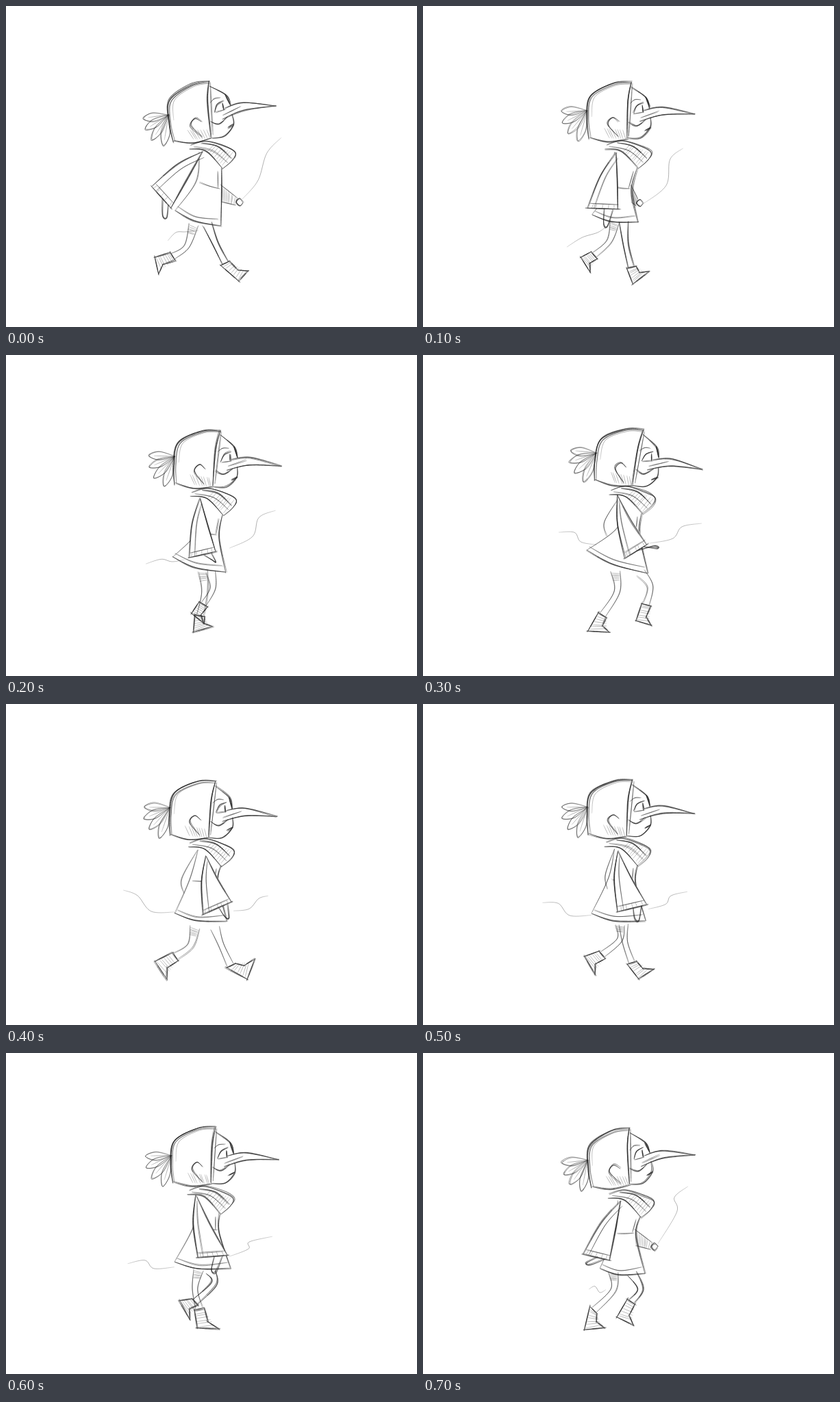
Write an HTML page with a canvas that moves like this. It is 600x469 px and loops after 0.8 s.

```html
<!DOCTYPE html>
<html lang="en">
<head>
<meta charset="utf-8">
<title>Walk cycle sketch</title>
<style>
html, body { margin: 0; width: 100%; height: 100%; overflow: hidden; background: #fff; }
canvas { display: block; width: 600px; height: 469px; }
</style>
</head>
<body>
<canvas id="stage" width="600" height="469"></canvas>
<script>
const ctx = document.getElementById('stage').getContext('2d');
const STEP = 100;

// head: shift and turn; sleeve: shoulder, cuff, cuff, hand;
// back and front: waist, hem; legs: hip, knee, ankle, heel, toe.
const reach = {
  head: [-2, 0, -6.5], collar: [2, 0],
  sleeve: [287, 213, 213, 264, 241, 295, 233, 308],
  back: [278, 256, 247, 298], front: [315, 270, 314, 321], far: [341, 287],
  nearLeg: [294, 319, 306, 348, 320, 376, 340, 402, 354, 387],
  farLeg: [274, 319, 264, 351, 243, 366, 217, 367, 223, 392],
  ahead: [345, 282, 368, 255, 381, 215, 402, 192],
  behind: [281, 328, 262, 330, 248, 331, 236, 343]
};
const plant = {
  head: [0, 0, 0], collar: [0, 0],
  sleeve: [282, 214, 240, 295, 285, 297, 268, 321],
  back: [276, 262, 247, 305], front: [305, 270, 314, 316], far: [317, 288],
  nearLeg: [293, 315, 296, 348, 304, 382, 306, 406, 330, 388],
  farLeg: [280, 315, 272, 344, 250, 364, 230, 367, 244, 389],
  ahead: [322, 289, 355, 262, 361, 224, 380, 208],
  behind: [268, 322, 255, 331, 232, 338, 210, 352]
};
const push = {
  head: [12, -4, 7], collar: [6, -5],
  sleeve: [284, 205, 295, 297, 327, 277, 341, 281],
  back: [286, 250, 239, 285], front: [316, 262, 328, 319], far: [265, 244],
  nearLeg: [281, 316, 283, 346, 262, 380, 241, 403, 272, 405],
  farLeg: [318, 318, 332, 338, 326, 365, 311, 388, 333, 395],
  ahead: [331, 275, 365, 268, 378, 251, 407, 246],
  behind: [253, 277, 230, 273, 221, 259, 198, 259]
};
const stretch = {
  head: [-1, 1, 3], collar: [0, 0],
  sleeve: [292, 222, 288, 308, 329, 290, 323, 312],
  back: [268, 256, 246, 306], front: [309, 262, 322, 318], far: [257, 255],
  nearLeg: [276, 326, 269, 353, 247, 369, 218, 376, 235, 402],
  farLeg: [305, 327, 314, 352, 328, 382, 352, 402, 363, 373],
  ahead: [332, 302, 355, 299, 369, 284, 383, 280],
  behind: [246, 304, 212, 303, 192, 280, 171, 272]
};
const pass = {
  head: [1.5, -3, 0.5], collar: [-1, -2],
  sleeve: [277, 208, 280, 299, 323, 296, 304, 319],
  back: [274, 252, 246, 305], front: [311, 262, 328, 315], far: [275, 245],
  nearLeg: [299, 320, 304, 337, 276, 364, 253, 362, 268, 389],
  farLeg: [281, 317, 276, 345, 282, 374, 279, 402, 311, 403],
  ahead: [326, 297, 354, 286, 355, 276, 389, 268],
  behind: [246, 313, 216, 315, 203, 303, 178, 308]
};
const lift = {
  head: [1, -0.5, -4.5], collar: [4, 3],
  sleeve: [289, 216, 234, 294, 272, 303, 242, 309],
  back: [280, 262, 258, 315], front: [311, 266, 324, 322], far: [338, 283],
  nearLeg: [305, 322, 317, 345, 304, 363, 283, 386, 307, 398],
  farLeg: [278, 321, 278, 347, 249, 376, 236, 404, 265, 402],
  ahead: [343, 279, 371, 232, 367, 211, 387, 195],
  behind: [267, 346, 258, 350, 251, 341, 242, 345]
};

const blend = (a, b) => Object.fromEntries(
  Object.keys(a).map(key => [key, a[key].map((v, i) => (v + b[key][i]) / 2)]));
const CYCLE = [reach, plant, blend(plant, push), push, stretch, blend(stretch, pass), pass, lift];

const pairs = v => v.flatMap((x, i) => i % 2 ? [] : [[x, v[i + 1]]]);
const mix = (a, b, t) => [a[0] + (b[0] - a[0]) * t, a[1] + (b[1] - a[1]) * t];
const add = (a, x, y) => [a[0] + x, a[1] + y];
// Point beside a, at right angles to the direction from b to c.
function side(a, b, c, d) {
  const x = c[0] - b[0], y = c[1] - b[1], r = d / Math.hypot(x, y);
  return [a[0] - y * r, a[1] + x * r];
}

let seed = 1;
function rnd(amp) {
  seed = (seed * 16807) % 2147483647;
  return (seed / 2147483647 * 2 - 1) * amp;
}

function smooth(p) {
  const out = [], n = p.length;
  for (let i = 0; i < n - 1; i++) {
    const a = p[Math.max(0, i - 1)], b = p[i], c = p[i + 1], d = p[Math.min(n - 1, i + 2)];
    for (let k = 0; k < 10; k++) {
      const t = k / 10;
      out.push([0, 1].map(j => b[j] + 0.5 * t * (c[j] - a[j] +
        t * (2 * a[j] - 5 * b[j] + 4 * c[j] - d[j] + t * (3 * (b[j] - c[j]) + d[j] - a[j])))));
    }
  }
  out.push(p[n - 1]);
  return out;
}

// One pencil pass that thins toward both ends.
function trace(points, width) {
  const p = smooth(points), n = p.length - 1;
  for (let i = 0; i < n; i++) {
    ctx.lineWidth = width * (0.5 + 0.6 * Math.sin(Math.PI * (i + 0.5) / n));
    ctx.beginPath();
    ctx.moveTo(...p[i]);
    ctx.lineTo(...p[i + 1]);
    ctx.stroke();
  }
}

// Weight 0 is a single faint line, 3 is the darkest.
function curve(points, weight = 1) {
  ctx.globalAlpha = 0.42 + weight * 0.06;
  for (let k = 0; k < Math.max(1, Math.min(3, weight + 1)); k++) {
    const amp = k ? 0.9 : 0.2, ox = rnd(amp), oy = rnd(amp);
    trace(points.map(p => add(p, ox + rnd(amp), oy + rnd(amp))), 0.75 + weight * 0.15);
  }
}
const line = (weight, ...v) => curve(pairs(v), weight);

function sides(points, weight) {
  for (let i = 1; i < points.length; i++) {
    const a = points[i - 1], b = points[i];
    curve([mix(a, b, -0.06), mix(a, b, 1.06)], weight);
  }
}

function hatch(a, b, c, d, count) {
  ctx.globalAlpha = 0.38;
  for (let i = 0; i < count; i++) {
    const t = (i + 0.5 + rnd(0.25)) / count;
    trace([mix(a, b, t), mix(c, d, t)], 0.75);
  }
}

function drawLeg([hip, knee, ankle, heel, toe], weight, striped) {
  const hl = side(hip, hip, knee, 7), hr = side(hip, hip, knee, -7);
  const kl = side(knee, hip, ankle, 4), kr = side(knee, hip, ankle, -4);
  const al = side(ankle, knee, ankle, 7), ar = side(ankle, knee, ankle, -7);
  curve([hl, kl, mix(ankle, al, 0.7)], weight);
  curve([hr, kr, mix(ankle, ar, 0.7)], weight);
  if (striped) hatch(mix(hl, kl, 0.05), mix(hl, kl, 0.5), mix(hr, kr, 0.1), mix(hr, kr, 0.45), 6);
  const instep = mix(mix(ankle, toe, 0.55), heel, 0.2);
  sides([al, ar, instep, toe, heel, al], 2);
  hatch(al, heel, ar, mix(instep, toe, 0.6), 7);
}

function drawFarArm(far, waist, nape) {
  if (far[0] > 300) {
    const a = add(waist, -2, -9), b = add(waist, -1, 16);
    const c = add(far, -3, -6), d = add(far, -6, 4);
    curve([a, c]);
    curve([b, d]);
    hatch(a, c, b, d, 10);
    curve([0, 1, 2, 3, 4].map(i => add(far, 5 * Math.cos(i * 1.57), 5 * Math.sin(i * 1.57))), 2);
  } else if (far[0] < 275) {
    curve([nape, far, add(far, 3, 21)]);
  }
}

function drawCoat(back, front, nape, chest) {
  const [waist, hem] = back, [belly, tip] = front;
  curve([nape, waist, hem]);
  curve([chest, belly, tip], 2);
  curve([add(chest, -6, 5), add(belly, -5, -4)]);
  const fold = add(mix(hem, tip, 0.42), 0, 6);
  curve([hem, fold, tip], 2);
  curve([add(hem, 4, -5), add(fold, 2, -6), add(tip, -4, -9)]);
  curve([add(waist, 4, 2), mix(waist, belly, 0.5), add(belly, -3, -3)]);
}

function drawCollar(dx, dy) {
  ctx.save();
  ctx.translate(dx, dy);
  line(2, 268, 203, 290, 197, 318, 205, 333, 214, 328, 226, 314, 238);
  line(2, 266, 209, 290, 212, 314, 237);
  line(1, 272, 205, 300, 211, 322, 229);
  line(2, 283, 200, 307, 205, 327, 223);
  hatch([300, 201], [332, 214], [290, 211], [315, 235], 8);
  ctx.restore();
}

function drawSleeve([top, a, b, hand]) {
  const swung = a[0] < top[0] - 12;
  const bow = side(mix(top, a, 0.45), top, a, 5);
  ctx.globalAlpha = 1;
  ctx.beginPath();
  [top, bow, a, b].forEach(p => ctx.lineTo(...p));
  ctx.fill();
  const inner = add(mix(top, b, 0.5), swung ? 0 : -2, 0);
  curve([top, bow, a], swung ? 2 : 3);
  curve([top, inner, b], swung ? 3 : 2);
  curve([add(top, 2, 8), mix(bow, inner, 0.3), mix(a, b, 0.2)], 1);
  sides([a, b], 2);
  curve([mix(a, top, 0.08), mix(b, top, 0.08)]);
  hatch(a, b, mix(a, top, 0.08), mix(b, top, 0.08), 5);
  curve([mix(a, b, 0.55), add(hand, -4, -2), add(hand, 2, 1), mix(a, b, 0.85)], 2);
}

function drawTail() {
  const root = [240, 153];
  for (let i = 0; i < 4; i++) {
    const turn = (178 - i * 24) * Math.PI / 180, length = 38 + i * 3;
    const tip = add(root, length * Math.cos(turn), length * Math.sin(turn));
    const mid = mix(root, tip, 0.6);
    curve([root, side(mid, root, tip, 6), tip, side(mid, root, tip, -6), root]);
    curve([root, mix(mid, tip, 0.5)], 0);
  }
}

function drawHair() {
  const dome = pairs([242, 194, 239, 165, 244, 132, 278, 113, 305, 111]);
  curve(dome, 3);
  curve(dome.map(p => mix(p, [298, 155], 0.05)), 1);
  curve(dome.slice(1).map(p => mix(p, [300, 140], 0.12)), 0);
  line(3, 304, 111, 299, 140, 298, 193);
  line(1, 306, 113, 301, 190);
  line(2, 243, 192, 270, 198, 299, 194);
  line(2, 286, 169, 277, 163, 270, 173, 285, 191);
  hatch([262, 178], [294, 181], [270, 193], [298, 195], 8);
}

function drawFace() {
  line(2, 304, 118, 326, 134, 331, 150);
  line(3, 325, 133, 331, 149);
  line(2, 332, 163, 332, 178, 318, 193, 299, 194);
  line(3, 333, 177, 324, 182);
  line(2, 300, 170, 312, 175, 325, 166);
  line(2, 307, 157, 312, 146, 322, 141);
  line(1, 308, 158, 323, 155);
  line(3, 320, 145, 321, 155);
  line(1, 302, 143, 309, 137, 318, 137);
  line(2, 322, 153, 350, 148, 397, 158);
  line(2, 317, 169, 350, 159, 397, 158);
  line(1, 318, 163, 345, 153);
}

function render(index) {
  const pose = CYCLE[index];
  const nearLeg = pairs(pose.nearLeg), farLeg = pairs(pose.farLeg);
  const back = pairs(pose.back), front = pairs(pose.front);
  const [dx, dy, turn] = pose.head;
  const nape = add(pose.collar, 280, 213), chest = add(pose.collar, 313, 236);
  const farBehind = farLeg[1][0] < nearLeg[1][0];
  seed = 4211 + index * 977;
  ctx.globalAlpha = 1;
  ctx.fillStyle = '#fff';
  ctx.fillRect(0, 0, 600, 469);
  ctx.strokeStyle = '#1c1c1c';
  curve(pairs(pose.ahead), 0);
  curve(pairs(pose.behind), 0);
  drawLeg(farLeg, 1, farBehind);
  drawLeg(nearLeg, farBehind ? 2 : 1, !farBehind);
  drawFarArm(pose.far, front[0], nape);
  drawCoat(back, front, nape, chest);
  drawSleeve(pairs(pose.sleeve));
  drawCollar(...pose.collar);
  ctx.save();
  ctx.translate(290 + dx, 160 + dy);
  ctx.rotate(turn * Math.PI / 180);
  ctx.translate(-290, -160);
  drawTail();
  drawHair();
  drawFace();
  ctx.restore();
}

let shown = -1;
const start = performance.now();
function tick(now) {
  const index = Math.floor(Math.max(0, now - start) / STEP) % CYCLE.length;
  if (index !== shown) render(shown = index);
  requestAnimationFrame(tick);
}
tick(start);
</script>
</body>
</html>
```
